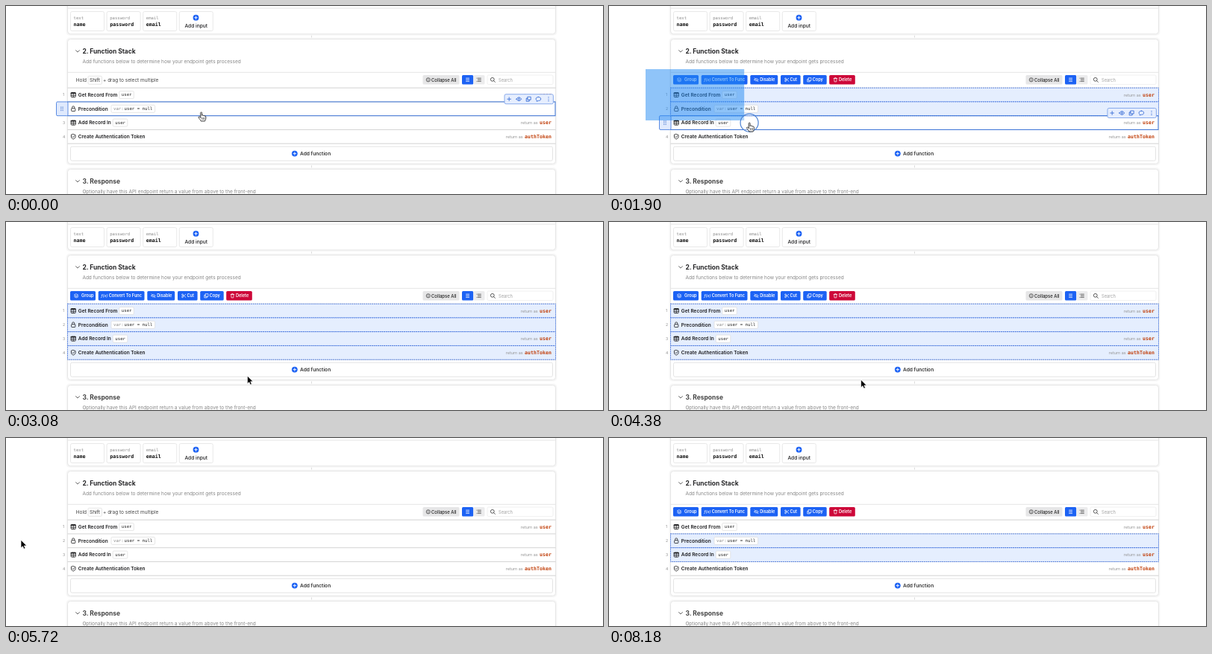
An HTML page for the animation above (8.6 s loop, 800x253 px).

```html
<!DOCTYPE html>
<html lang="en">
<head>
<meta charset="utf-8">
<title>Function stack multi-select</title>
<style>
  html, body { margin: 0; width: 100%; height: 100%; overflow: hidden; background: #fff; }
  svg { display: block; width: 100%; height: 100%; }
  text { font-family: Inter, Roboto, sans-serif; white-space: pre; }
  .mono { font-family: "DejaVu Sans Mono", "Liberation Mono", monospace; }
</style>
</head>
<body>
<svg id="stage" viewBox="0 0 800 253" xmlns="http://www.w3.org/2000/svg"></svg>
<script>
const LOOP = 8600, TOP = 110.2, ROW_H = 18.75;
const BLUE = '#1c62f4', LINE = '#e3e3e3', INK = '#1d1d1f';
const stage = document.getElementById('stage');
const rowY = i => TOP + ROW_H * i;

// Drawing helpers
const text = (x, cy, str, size, weight = 400, fill = INK, extra = '') =>
  `<text x="${x}" y="${(cy + size * 0.36).toFixed(2)}" font-size="${size}" font-weight="${weight}" fill="${fill}" ${extra}>${str}</text>`;
const mono = (x, cy, str, size, weight, fill, extra = '') =>
  text(x, cy, str, size, weight, fill, 'class="mono" ' + extra);
const rect = (x, y, w, h, r, fill, stroke = 'none', extra = '') =>
  `<rect x="${x}" y="${y}" width="${w}" height="${h}" rx="${r}" fill="${fill}" stroke="${stroke}" ${extra}/>`;
const path = (d, stroke, width = 0.8, fill = 'none') =>
  `<path d="${d}" fill="${fill}" stroke="${stroke}" stroke-width="${width}" stroke-linecap="round" stroke-linejoin="round"/>`;
const at = (x, y, body) => `<g transform="translate(${x} ${y})">${body}</g>`;
const group = (id, body) => `<g id="${id}">${body}</g>`;

// Icons, each centred on 0,0
const icon = {
  table: rect(-3, -3, 6, 6, 0.8, 'none', INK, 'stroke-width=".9"') +
    path('M-3 -2.3H3', INK, 1.4) + path('M-3 .6H3M0 -2V3', INK, 0.8),
  lock: rect(-2.6, -0.6, 5.2, 3.8, 0.7, 'none', INK, 'stroke-width=".8"') +
    path('M-1.6 -.8V-1.9A1.6 1.6 0 0 1 1.6 -1.9V-.8', INK),
  shield: path('M0 -3.3L2.8 -2.3V.2C2.8 1.8 1.3 2.8 0 3.3C-1.3 2.8 -2.8 1.8 -2.8 .2V-2.3Z', INK) +
    path('M-1.2 0L-.3 .9L1.3 -.9', INK),
  plusDot: `<circle r="3.9" fill="${BLUE}"/>` + path('M-1.8 0H1.8M0 -1.8V1.8', '#fff', 0.9),
  chevron: path('M-2.5 -1.2L0 1.3L2.5 -1.2', '#555', 0.9),
  layers: path('M0 -2.5L2.5 -1.2L0 .1L-2.5 -1.2ZM-2.5 .2L0 1.5L2.5 .2M-2.5 1.4L0 2.7L2.5 1.4', '#fff', 0.6),
  fx: text(-4.4, 0, 'f(x)', 5.2, 500, '#fff', 'font-style="italic"'),
  hide: path('M-2.7 0Q0 -3.2 2.7 0Q0 3.2 -2.7 0ZM-2.4 -2.4L2.4 2.4', '#fff', 0.7),
  cut: path('M-1 -.8L2.6 2M-1 .8L2.6 -2', '#fff', 0.7) +
    '<g fill="none" stroke="#fff" stroke-width=".7"><circle cx="-1.7" cy="-1.5" r=".9"/><circle cx="-1.7" cy="1.5" r=".9"/></g>',
  copy: path('M-1 -2.6H2.6V1H-1ZM-1 -.9H-2.6V2.6H.9V1', '#fff', 0.7),
  trash: path('M-2.3 -1.8H2.3M-.8 -1.8V-2.7H.8V-1.8M-1.7 -1.8L-1.4 2.6H1.4L1.7 -1.8', '#fff', 0.7)
};

const chip = (x, cy, w) => rect(x, cy - 5, w, 10, 1.5, '#fff', '#dcdcdc', 'stroke-width=".7"');

const panel = (y, h) =>
  rect(80.5, y - 2, 658, h + 4, 5, '#f7f7f7') +
  rect(82.5, y, 654, h, 4, '#fff', LINE, 'stroke-width=".9"');

function inputs() {
  const fields = [['text', 'name'], ['password', 'password'], ['email', 'email']];
  const box = i => rect(86.5 + 48.6 * i, 7.5, 45, 26, 2, '#fff', LINE, 'stroke-width=".8"');
  return fields.map(([type, name], i) => {
    const x = 90.6 + 48.6 * i;
    return box(i) + mono(x, 15.8, type, 5.6, 400, '#8d8d8d') + mono(x, 24.6, name, 6.65, 700, '#111');
  }).join('') + box(3) + at(254.5, 15.7, icon.plusDot) +
    text(254.7, 26.7, 'Add input', 6.6, 500, INK, 'text-anchor="middle"');
}

function hint() {
  return text(93.7, 99.7, 'Hold', 6.5, 400, '#444') +
    rect(110, 94.3, 18.4, 11, 1.5, '#fff', '#dcdcdc', 'stroke-width=".7"') +
    text(112, 99.7, 'Shift', 6.5, 400, '#333') +
    text(130, 99.7, '+ drag to select multiple', 6.5, 400, '#444');
}

function actions() {
  const items = [[86, 34, 'layers', 'Group', 15], [123.7, 61.8, 'fx', 'Convert To Func', 14],
    [189.3, 36.9, 'hide', 'Disable', 13], [230, 26.6, 'cut', 'Cut', 12.5],
    [260.2, 31.5, 'copy', 'Copy', 12.5], [295.2, 34.6, 'trash', 'Delete', 12.8]];
  return items.map(([x, w, name, label, dx]) =>
    rect(x, 93, w, 12.6, 1.6, name === 'trash' ? '#cd0839' : BLUE) +
    at(x + (name === 'fx' ? 8.3 : 8.2), 99.3, icon[name]) +
    text(x + dx, 99.4, label, 5.6, 600, '#fff')).join('');
}

function viewTools() {
  const list = (x, c) => path(`M${x - 2} 97.2H${x + 2}M${x - 2} 99.3H${x + 2}M${x - 2} 101.4H${x + 2}`, c, 0.8);
  return rect(558.5, 93, 49, 12.6, 1.6, '#e6e6e7') +
    `<circle cx="565.8" cy="99.3" r="2.6" fill="none" stroke="#333" stroke-width=".7"/>` +
    path('M564.7 98.7L565.8 97.9L566.9 98.7M564.7 100L565.8 100.8L566.9 100', '#333', 0.5) +
    text(570, 99.4, 'Collapse All', 5.95, 500, '#222') +
    rect(611, 93, 15.3, 12.6, 1.6, BLUE) + list(618.6, '#fff') +
    rect(626.3, 93, 15.2, 12.6, 1.6, '#ececed') + list(634.4, '#444') +
    path('M631 97.2H631.1M631 101.4H631.1', '#444', 0.9) +
    rect(645, 93, 88, 12.6, 1.6, '#fff', '#ececec', 'stroke-width=".8"') +
    `<circle cx="651.8" cy="98.8" r="2.4" fill="none" stroke="#333" stroke-width=".8"/>` +
    path('M653.6 100.6L655.4 102.4', '#333') +
    text(660, 99.5, 'Search', 5.7, 400, '#a0a0a0');
}

function rows() {
  const items = [
    { icon: 'table', label: 'Get Record From', chip: 151.7, out: 'user' },
    { icon: 'lock', label: 'Precondition' },
    { icon: 'table', label: 'Add Record In', chip: 143.2, out: 'user' },
    { icon: 'shield', label: 'Create Authentication Token', out: 'authToken' }
  ];
  return items.map((r, i) => {
    const cy = rowY(i) + ROW_H / 2;
    let s = text(76, cy, i + 1, 5.2, 400, '#909090') +
      group('sel' + i, rect(82.5, rowY(i), 654, ROW_H, 0, '#e5eefe', '#2c63dc', 'stroke-width=".9" stroke-dasharray="1.6 1.1"')) +
      at(90.2, cy, icon[r.icon]) + text(96.8, cy, r.label, 6.5, 600);
    if (r.chip) s += chip(r.chip, cy, 19.6) + mono(r.chip + 3.1, cy - 0.3, 'user', 5.7, 500, '#222');
    if (i === 1) s += chip(141, cy, 58.6) + mono(144, cy - 0.3, 'var:', 5.7, 400, '#8a8a8a') +
      mono(158.6, cy - 0.3, 'user = null', 5.7, 500, '#222');
    if (r.out) s += text(731 - r.out.length * 4 - 2.4, cy, 'return as', 5.4, 400, '#929292', 'text-anchor="end"') +
      mono(731, cy, r.out, 6.65, 700, '#c2430f', 'text-anchor="end"');
    return s;
  }).join('');
}

// Hover decoration, drawn for a row whose top edge is 0
function hover() {
  let grip = '';
  for (let i = 0; i < 6; i++)
    grip += `<circle cx="${73.8 + 2.3 * (i % 2)}" cy="${ROW_H / 2 - 2.2 + 2.2 * (i >> 1)}" r=".65" fill="#3468c8"/>`;
  const c = '#2a62d2';
  const tools = rect(668, -10.2, 65.4, 13, 2, '#e6eefe', '#7ea3ea', 'stroke-width=".9"') +
    at(0, -3.7,
      path('M671.8 0H676.6M674.2 -2.4V2.4', c) +
      path('M683.8 0Q687.3 -5 690.8 0Q687.3 5 683.8 0Z', c) + `<circle cx="687.3" r="1.2" fill="none" stroke="${c}" stroke-width=".8"/>` +
      path('M699.2 -3H703.2V1H699.2ZM699.2 -1H697.2V3H701.2V1', c) +
      path('M713.4 -2.8C715.4 -2.8 716.7 -1.6 716.7 -.2C716.7 1.3 715.4 2.3 713.4 2.3L711 3L711.3 1.8C710.5 1.3 710.1 .6 710.1 -.2C710.1 -1.6 711.4 -2.8 713.4 -2.8Z', c) +
      path('M727 -2.4H727.05M727 0H727.05M727 2.4H727.05', c, 1.2));
  return group('outline', rect(82.5, 0, 653.5, ROW_H, 0, 'none', '#3b74d9', 'stroke-width="1"')) +
    rect(67.5, 0, 15.5, ROW_H, 1.5, '#e0eafd', '#4a80e0', 'stroke-width=".9"') + grip + tools;
}

const heading = (cy, title, note, fill) =>
  at(96, cy, icon.chevron) + text(102.4, cy + 0.1, title, 8.45, 700, fill) +
  text(102.4, cy + 13.8, note, 6.5, 400, '#858585');

const hLine = (y, c) => `<path d="M82.5 ${y}H736.5" stroke="${c}" stroke-width=".9"/>`;

stage.innerHTML =
  '<path d="M409.5 36V222" stroke="#dcdcdc" stroke-width="1"/>' +
  panel(-20, 57.8) + hLine(3, LINE) + inputs() +
  panel(44.5, 168) +
  heading(60.8, '2. Function Stack', 'Add functions below to determine how your endpoint gets processed', '#262628') +
  hLine(89.3, LINE) + group('hint', hint()) + group('actions', actions()) + viewTools() +
  [0, 1, 2, 3, 4].map(i => hLine(rowY(i), '#cfcfcf')).join('') + rows() +
  rect(86.5, 189.2, 646, 19, 2, '#fff', '#dedede', 'stroke-width=".8"') +
  at(386.8, 198.6, icon.plusDot) + text(394, 198.8, 'Add function', 6.6, 600, '#333') +
  panel(219.5, 60) +
  heading(235.7, '3. Response', 'Optionally have this API endpoint return a value from above to the front-end', '#444') +
  group('hover', hover()) +
  '<rect id="marquee" fill="#218af3" fill-opacity=".5"/>' +
  '<g id="pointer">' +
    '<circle id="ring" fill="#fff" fill-opacity=".3" stroke="#4a80d2" stroke-width="1.2"/>' +
    group('arrow', path('M0 0V10.4L2.4 8.2L4 11.7L5.9 10.9L4.3 7.5H7.5Z', '#fff', 0.7, '#000')) +
    group('hand', path('M-.9 .8C-.9 -.5 1 -.5 1 .8V4.3C1.3 3.4 2.9 3.5 2.9 4.7C3.3 4 4.7 4.2 4.7 5.3C5.1 4.7 6.3 5 6.3 6.1V8.3C6.3 10 5.2 10.6 5.1 11.9H-.3C-.6 10.2 -2.6 9 -3.4 7.2C-3.9 6 -2.6 5.4 -1.8 6.3L-.9 7.3Z', '#222', 0.9, '#fff') +
      path('M1.2 7.3V9.7M2.8 7.3V9.7M4.4 7.3V9.7', '#222', 0.6)) +
  '</g>';

const el = id => document.getElementById(id);
const show = (id, on) => { el(id).style.display = on ? '' : 'none'; };

// Pointer stops: time, x, y, eased arrival
const stops = [
  [0, 261.5, 143], [40, 261.5, 143], [340, 49, 85.6, 1], [600, 49, 85.6], [700, 49, 85], [1060, 49, 85],
  [1370, 115, 123], [1420, 122, 126], [2330, 247, 185], [2380, 254.6, 187.6], [2820, 308, 203],
  [2900, 312, 204], [3340, 343, 213, 1], [4080, 343, 213], [4380, 337.6, 212.4, 1],
  [5400, 20, 137.5, 1], [5820, 20, 137.5], [6470, 295, 158, 1], [6760, 295, 158], [7920, 332, 264, 1]
];

function pointer(t) {
  const k = stops.findIndex(s => s[0] > t);
  if (k < 0) return stops[stops.length - 1].slice(1, 3);
  const [t0, x0, y0] = stops[k - 1], [t1, x1, y1, eased] = stops[k];
  let u = (t - t0) / (t1 - t0);
  if (eased) u = u * u * (3 - 2 * u);
  return [x0 + (x1 - x0) * u, y0 + (y1 - y0) * u];
}

// Each drag stays selected until the clearing click
const drags = [
  { down: 1060, up: 2900, clear: 5480 },
  { down: 5780, up: 6730, clear: LOOP }
];
const LAG = 50, SELECT_LAG = 130;

function render(t) {
  const [x, y] = pointer(t);
  const drag = drags.find(d => t >= d.down && t < d.clear);
  const pressed = !!drag && t < drag.up;
  let any = false, from, reach;

  if (drag) {
    from = pointer(drag.down);
    reach = pointer(Math.max(drag.down, Math.min(t, drag.up) - SELECT_LAG))[1];
  }
  const selected = [0, 1, 2, 3].map(i => {
    const on = !!drag && t > drag.down + SELECT_LAG && from[1] < rowY(i + 1) && reach > rowY(i) + 6;
    any = any || on;
    show('sel' + i, on);
    return on;
  });
  show('actions', any);
  show('hint', !any);

  const row = Math.floor((y - TOP) / ROW_H);
  const over = x > 67 && x < 737 && row >= 0 && row < 4;
  show('hover', over);
  if (over) {
    el('hover').setAttribute('transform', `translate(0 ${rowY(row)})`);
    show('outline', !selected[row]);
  }

  show('marquee', pressed);
  show('ring', pressed);
  if (pressed) {
    const [ex, ey] = pointer(Math.max(drag.down, t - LAG));
    const m = el('marquee');
    m.setAttribute('x', from[0]);
    m.setAttribute('y', from[1]);
    m.setAttribute('width', Math.max(0, ex - from[0]));
    m.setAttribute('height', Math.max(0, ey - from[1]));
    el('ring').setAttribute('r', 12 * Math.min(1, 0.5 + (t - drag.down) / 160));
  }
  show('arrow', !over);
  show('hand', over);
  el('pointer').setAttribute('transform', `translate(${x} ${y})`);
}

const start = performance.now();
function tick() {
  render((performance.now() - start) % LOOP);
  requestAnimationFrame(tick);
}
tick();
</script>
</body>
</html>
```
